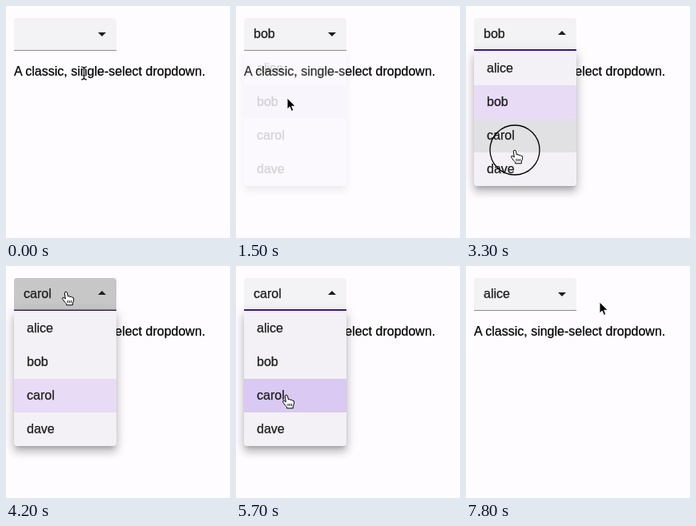
An HTML page that plays this animation: 280x290 px, repeating every 7.9 s.

```html
<!DOCTYPE html>
<html lang="en">
<head>
<meta charset="utf-8">
<title>Dropdown</title>
<style>
html, body { margin: 0; width: 100%; height: 100%; overflow: hidden; background: #fefcff; }
body { position: relative; font: 16px "Liberation Sans", Arial, sans-serif; color: #000; -webkit-text-stroke: .25px; }
body > * { position: absolute; }
p { left: 10px; top: 72px; margin: 0; line-height: 20px; white-space: nowrap; }
#select { left: 10px; top: 15px; width: 128px; height: 41px; border-radius: 4px 4px 0 0; overflow: hidden; background: #f3f2f4; }
#select > * { position: absolute; }
#shade { inset: 0; background: #000; }
#label { left: 12px; line-height: 40px; color: #1c1c1c; }
#caret { left: 105px; width: 10px; height: 5px; background: #1c1c1c; }
#line, #focus { left: 0; right: 0; bottom: 0; height: 1px; }
#focus { height: 2px; background: #42149a; }
#menu {
  left: 10px; top: 56px; width: 128px; padding-top: 1px; background: #f3f1f5; overflow: hidden;
  border-radius: 0 0 4px 4px; transform-origin: 0 0; color: #1c1c1c;
  box-shadow: 0 5px 5px -3px #0003, 0 8px 10px 1px #00000024, 0 3px 14px 2px #0000001f;
}
#menu div { height: 42px; line-height: 42px; padding-left: 16px; }
svg { left: 0; top: 0; }
</style>
</head>
<body>
<p>A classic, single-select dropdown.</p>
<div id="select">
  <div id="shade"></div>
  <div id="label"></div>
  <div id="caret"></div>
  <div id="line"></div>
  <div id="focus"></div>
</div>
<div id="menu"></div>
<svg width="280" height="290">
  <defs><path id="ibeam" d="M-3.5 -8Q-.5 -8 0 -6Q.5 -8 3.5 -8M0 -6V6M-3.5 8Q-.5 8 0 6Q.5 8 3.5 8M-2 3H2"/></defs>
  <circle id="ring" fill="none" stroke="#000" stroke-width="1.3"/>
  <g id="cursor">
    <g id="hand" fill="#fff" stroke="#000" stroke-linejoin="round">
      <path d="M-1.7 1.8Q-1.6 .3 0 .3Q1.3 .3 1.6 1.8L2.4 6Q4.2 4.9 5 6.5Q6.8 5.6 7.4 7.2Q9.7 6.6 9.7 9.4Q9.7 12 8.3 14V16.8H.6V15.2Q-2 13 -3.4 10.5Q-5 8.6 -4.2 7.6Q-2.9 6.6 -.7 9Z"/>
      <path d="M2 11V14.2M4.2 11V14.2M6.4 11V14.2" stroke-width=".9"/>
    </g>
    <g id="beam" fill="none">
      <use href="#ibeam" stroke="#fff" stroke-width="2.4"/>
      <use href="#ibeam" stroke="#000" stroke-width="1.1"/>
    </g>
    <path id="arrow" d="M0 0V14.2L3.2 11.2L5.4 16.4L7.9 15.4L5.7 10.3H10.2Z" fill="#000" stroke="#fff"/>
  </g>
</svg>
<script>
const $ = id => document.getElementById(id);
const LOOP = 7900;
const MENU_TOP = 57, ROW = 42;
const names = ['alice', 'bob', 'carol', 'dave'];
const rows = names.map(name => {
  const row = document.createElement('div');
  row.textContent = name;
  return $('menu').appendChild(row);
});

// Each round opens the menu from `field`, drifts to `over`, and picks the row at `spot`.
const rounds = [
  { open: 570, leave: 620, arrive: 900, pick: 1440, field: [76, 40], over: [66, 107], spot: [64, 115] },
  { open: 1960, leave: 2300, arrive: 3100, pick: 3380, field: [69, 40], over: [61, 180], spot: [61, 180] },
  { open: 4080, leave: 4400, arrive: 5700, pick: 6380, field: [75, 32], over: [63, 161], spot: [74, 75] }
];
const stops = [
  { at: 50, pos: [97.5, 84] },
  ...rounds.flatMap(r => [
    { at: r.open - 120, pos: r.field },
    { at: r.leave, pos: r.field },
    { at: r.arrive, pos: r.over },
    { at: r.pick - 230, pos: r.spot },
    { at: r.pick + 80, pos: r.spot }
  ]),
  { at: 7500, pos: [74, 75] },
  { at: 7790, pos: [167, 45] }
];
const clicks = rounds.flatMap(r => [r.open - 100, r.pick - 190]);

const ramp = (t, from, length) => Math.max(0, Math.min(1, (t - from) / length));
const rowAt = y => Math.floor((y - MENU_TOP) / ROW);

function pointerAt(t) {
  const i = stops.findIndex(s => s.at > t);
  if (i <= 0) return stops.at(i).pos;
  const a = stops[i - 1], b = stops[i];
  const u = ramp(t, a.at, b.at - a.at), e = u * u * (3 - 2 * u);
  return a.pos.map((v, k) => v + (b.pos[k] - v) * e);
}

// Hover tint plus press ripple, fading once the pointer has left the field.
function shadeAt(t) {
  return Math.max(...rounds.map(r =>
    (.04 * ramp(t, r.open - 220, 100) + .14 * ramp(t, r.open - 100, 100)) * (1 - ramp(t, r.leave + 100, 350))));
}

function render(t) {
  const [x, y] = pointerAt(t);
  const round = rounds.find(r => t >= r.open && t < r.pick + 75);
  const last = rounds.filter(r => t >= r.pick).pop();
  const value = last ? rowAt(last.spot[1]) : -1;
  const open = !!round && t < round.pick;
  const inColumn = x >= 10 && x < 138;
  const onSelect = inColumn && y >= 15 && y < MENU_TOP;
  const hovered = open && inColumn ? rowAt(y) : -1;

  $('shade').style.opacity = shadeAt(t);
  $('label').textContent = names[value] || '';
  $('caret').style.top = (open ? 16 : 18) + 'px';
  $('caret').style.clipPath = open ? 'polygon(0 100%, 50% 0, 100% 100%)' : 'polygon(0 0, 100% 0, 50% 100%)';
  $('line').style.background = onSelect || open ? '#222' : '#8c8c8c';
  $('focus').style.opacity = open ? ramp(t, round.open + 80, 100) : 0;

  const menu = $('menu').style;
  menu.visibility = round ? 'visible' : 'hidden';
  if (round) {
    const grow = 1 - (1 - ramp(t, round.open, 120)) ** 3;
    menu.opacity = open ? ramp(t, round.open, 30) : 1 - ramp(t, round.pick, 75);
    menu.transform = `scale(${.8 + .2 * grow})`;
  }
  rows.forEach((row, i) => {
    const over = i === hovered;
    row.style.background = i === value ? (over ? '#d9c9f3' : '#e8dbf6') : over ? '#e1e0e2' : 'none';
  });

  const click = clicks.find(c => t >= c && t < c + 130);
  $('ring').setAttribute('r', click ? 31 * ramp(t, click, 105) : 0);
  $('ring').setAttribute('cx', x);
  $('ring').setAttribute('cy', y);

  const onText = y >= 72 && y < 92 && x >= 10 && x < 249;
  const kind = onSelect || names[hovered] ? 'hand' : onText ? 'beam' : 'arrow';
  for (const id of ['hand', 'beam', 'arrow']) $(id).style.display = id === kind ? '' : 'none';
  $('cursor').setAttribute('transform', `translate(${x} ${y})`);
}

const start = performance.now();
function tick() {
  render((performance.now() - start) % LOOP);
  requestAnimationFrame(tick);
}
tick();
</script>
</body>
</html>
```
